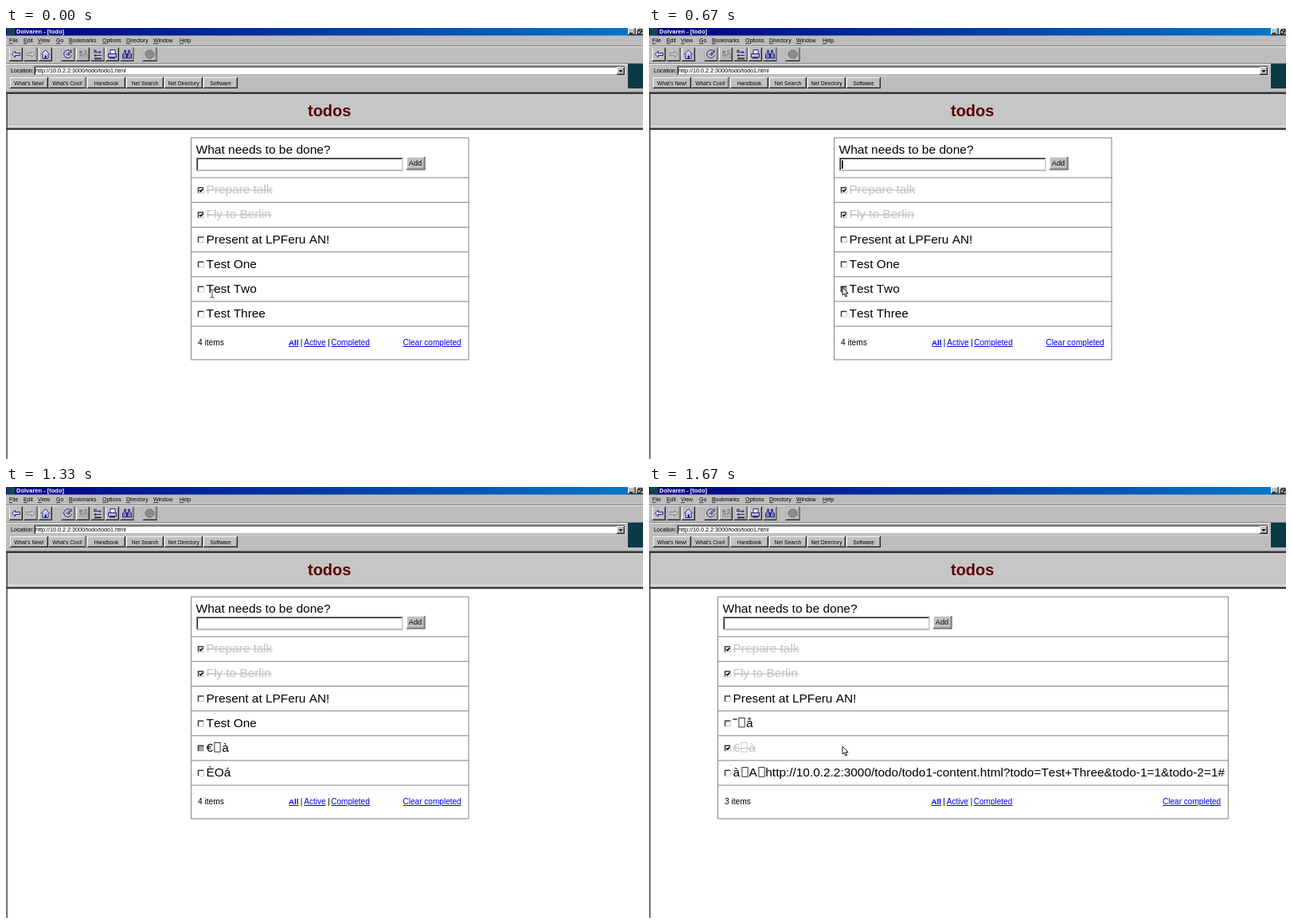
These frames come from a looping animation (800x542 px, 5000 ms). An HTML page:

```html
<!DOCTYPE html>
<html lang="en">
<head>
<meta charset="utf-8">
<title>todo</title>
<style>
  html, body { margin: 0; width: 100%; height: 100%; overflow: hidden; background: #fff; }
  svg { display: block; width: 100%; height: 100%; }
  text { font-family: "Liberation Sans", Arial, sans-serif; font-kerning: none; white-space: pre; }
</style>
</head>
<body>
<svg id="stage" viewBox="0 0 800 542"></svg>
<script>
const LOOP = 5000;
const stage = document.getElementById('stage');

const rect = (x, y, w, h, fill, extra = '') =>
  `<rect x="${x}" y="${y}" width="${w}" height="${h}" fill="${fill}" ${extra}/>`;
const path = (d, stroke, fill = 'none', width = 1) =>
  `<path d="${d}" stroke="${stroke}" fill="${fill}" stroke-width="${width}"/>`;
const text = (x, y, size, str, fill = '#000', extra = '') =>
  `<text x="${x}" y="${y}" font-size="${size}" fill="${fill}" ${extra}>${str}</text>`;

// Raised grey box with light and dark edges
const raised = (x, y, w, h, face = '#c0c0c0') =>
  rect(x, y, w, h, '#222') + rect(x, y, w - 1, h - 1, '#f4f4f4') +
  rect(x + 1, y + 1, w - 2, h - 2, '#808080') + rect(x + 1, y + 1, w - 3, h - 3, face);

const sunken = (x, y, w, h) =>
  rect(x, y, w, h, '#ddd') + rect(x, y, w - 1, h - 1, '#808080') +
  rect(x + 1, y + 1, w - 2, h - 2, '#c8c8c8') + rect(x + 1, y + 1, w - 3, h - 3, '#222') +
  rect(x + 2, y + 2, w - 4, h - 4, '#fff');

const groove = y => rect(0, y, 800, 1, '#808080') + rect(0, y + 1, 800, 1, '#eee');

function icons() {
  const blue = '#20208c', grey = '#858585';
  const arrow = 'M0 4L4 0V2.5H10V5.5H4V8Z';
  const at = (x, y, body) => `<g transform="translate(${x} ${y})">${body}</g>`;
  return at(7.5, 29, path(arrow, blue, '#d8d8ff')) +
    at(36, 29, `<g transform="scale(-1 1)">${path(arrow, grey, '#ccc')}</g>`) +
    at(44, 27.5, path('M0 6L5.5 0L11 6M2 5V11H9V5', blue, '#d8d8ff') + rect(4.5, 7, 2.5, 4, blue)) +
    at(72, 27, path('M9.5 2.5A5 5 0 1 0 10.5 7M10 0V4H6', blue) + path('M3.5 6H8M6 4L8 6L6 8', blue)) +
    at(92, 27.5, rect(0, 1, 4, 4, grey) + rect(6, 0, 4, 4, '#999') + path('M1 11V7H4V11M7 11V5H10V11M0 7L10 5', grey)) +
    at(110, 27.5, path('M0 3H9M7 1L9 3L7 5M1 7H10M3 5L1 7L3 9', blue) + rect(1, 10, 9, 2, '#333') + rect(0, 0, 4, 2, '#555')) +
    at(128, 27.5, path('M3 5V0H9V5', blue, '#fff') + path('M.5 5H10.5V9.5H.5Z', blue, '#bbc') + rect(2, 9, 7, 2, blue)) +
    at(146.5, 28, path('M2 0H4V4L5 5V10H0V5L2 3ZM7 0H9V3L11 5V10H6V5L7 4Z', blue, '#8080b8') + rect(4, 4, 3, 2, blue)) +
    at(175, 28, path('M3 0H8L11 3V7L8 10H3L0 7V3Z', '#777', '#8c8c8c'));
}

function chrome() {
  const menu = [['File', 4], ['Edit', 22], ['View', 40], ['Go', 63], ['Bookmarks', 79],
    ['Options', 121], ['Directory', 151], ['Window', 185], ['Help', 218]];
  const tools = [[4, 17], [22.5, 17], [41, 17], [69.5, 17], [88, 17], [106.5, 17], [125, 17], [143.5, 17], [171.5, 18]];
  const shortcuts = [["What's New!", 5, 48], ["What's Cool!", 53.5, 47], ['Handbook', 102, 48],
    ['Net Search', 151, 47], ['Net Directory', 199, 48], ['Software', 248, 43]];
  return `<defs><linearGradient id="bar"><stop stop-color="#000082"/><stop offset="1" stop-color="#0878c8"/></linearGradient></defs>` +
    rect(0, 0, 800, 128, '#bdbdbd') + rect(0, 0, 800, 9.5, 'url(#bar)') +
    rect(1, 0, 10, 9, '#17434c') +
    text(13, 6.8, 7.5, 'Dolvaren - [todo]', '#fff', 'font-weight="bold"') +
    raised(781, 0, 9.5, 9) + rect(783, 6, 4, 1.3, '#000') +
    raised(791, 0, 10, 9) + path('M794.5 3V1.5H798.5V5H797M793 3.5H797V7H793Z', '#000') +
    menu.map(([s, x]) => text(x, 18.4, 6.9,
      `<tspan text-decoration="underline">${s[0]}</tspan>${s.slice(1)}`)).join('') +
    groove(22) +
    tools.map(([x, w]) => raised(x, 24.5, w, 17.5)).join('') + icons() +
    groove(44) +
    text(6, 56.3, 7.1, 'Location:') +
    sunken(35, 47.5, 743, 13) + text(37, 56.4, 7.2, 'http://10.0.2.2:3000/todo/todo1.html') +
    raised(767, 49, 10, 10) + path('M769.5 53H774.5L772 56Z', 'none', '#000') +
    shortcuts.map(([s, x, w]) => raised(x, 62, w, 14) +
      text(x + w / 2, 71.8, 6.7, s, '#000', 'text-anchor="middle"')).join('') +
    rect(781, 45, 19, 31, '#0b3a46') +
    rect(0, 80, 800, 1, '#808080') + rect(0, 81, 800, 2, '#333') +
    rect(2, 83, 798, 40, '#c6c6c6') +
    rect(0, 123, 800, 1.5, '#eee') + rect(0, 124.5, 800, 1.5, '#aaa') + rect(0, 126, 800, 2, '#333') +
    text(406.2, 111, 20, 'todos', '#5c0000', 'font-weight="bold" text-anchor="middle"') +
    rect(0, 128, 800, 414, '#fff') + rect(0, 82, .7, 460, '#888') + rect(.7, 82, 1, 460, '#222');
}

function checkbox(x, y, done, pressed) {
  return rect(x, y, 8, 8, '#d4d4d4') + rect(x, y, 7.3, 7.3, '#333') +
    rect(x + 1.4, y + 1.4, 5.9, 5.9, pressed ? '#a8a8a8' : '#fff') +
    (done ? path(`M${x + 2.3} ${y + 3.8}l1.5 1.7l2.9 -3.3`, '#000', 'none', 1.6) : '');
}

// Each part is [offset, string]; an empty string draws the missing-glyph box
function row(x, i, { parts, done, pressed, width }) {
  const top = 188 + i * 31.15, base = top + 20.2, ink = done ? '#c0c0c0' : '#000';
  return rect(x, top, 1, 1, '#888') +
    checkbox(x + 8.8, top + 12, done, pressed) +
    parts.map(([dx, s]) => s ? text(x + 19.5 + dx, base, 15.4, s, ink)
      : rect(x + 19.5 + dx + .4, base - 11.3, 7.2, 11.6, 'none', `stroke="${ink}" stroke-width=".8"`)).join('') +
    (done ? rect(x + 19.8, base - 4.9, width, 1.2, ink) : '');
}

function card(x, w, rows, left, linkX) {
  const right = x + w;
  const link = (lx, s, extra = '', size = 10.05) =>
    text(lx, 399, size, s, '#0000e8', `text-decoration="underline" ${extra}`);
  const lines = Array.from({ length: 7 }, (_, i) => rect(x, 187.6 + i * 31.15, w, 1.1, '#8c8c8c')).join('');
  return rect(x + .5, 138.1, w - 1, 279, '#fff', 'stroke="#8c8c8c" stroke-width="1.1"') + lines +
    text(x + 6.6, 158, 15.5, 'What needs to be done?') +
    sunken(x + 7, 163, 260, 17.3) +
    raised(x + 271, 162, 23.5, 16.5) + text(x + 273.8, 173, 9.2, 'Add') +
    rows.map((r, i) => row(x, i, r)).join('') +
    text(x + 9, 399, 10.2, `${left} items`) +
    link(linkX, 'All', 'font-weight="bold"', 9.8) + text(linkX + 14.7, 399, 10, '|') +
    link(linkX + 19.3, 'Active') + text(linkX + 49.2, 399, 10, '|') +
    link(linkX + 53.2, 'Completed') +
    link(right - 9.8, 'Clear completed', 'text-anchor="end"');
}

const plain = s => ({ parts: [[0, s]] });
const head = [
  { parts: [[0, 'Prepare talk']], done: true, width: 83 },
  { parts: [[0, 'Fly to Berlin']], done: true, width: 82 },
  plain('Present at LPFeru AN!')
];
const testOne = plain('Test One');
const euro = [[0, '€'], [10, ''], [19.8, 'à']];
const longUrl = 'http://10.0.2.2:3000/todo/todo1-content.html?todo=Test+Three&amp;todo-1=1&amp;todo-2=1#';

const first = card(232, 349.5, [...head, testOne, plain('Test Two'), plain('Test Three')], 4, 355);
const garbled = card(232, 349.5, [...head, testOne,
  { parts: euro, pressed: true }, plain('ÈOá')], 4, 355);
const last = card(86, 642, [...head,
  { parts: [[0, '˜'], [7, ''], [16.4, 'å']] },
  { parts: euro, done: true, width: 28 },
  { parts: [[0, 'à'], [11, ''], [20, 'A'], [32, ''], [40.8, longUrl]] }], 3, 354.5);

const group = (id, body) => `<g id="${id}">${body}</g>`;
stage.innerHTML = chrome() +
  group('first', first) + group('garbled', garbled) + group('last', last) +
  group('pressed', checkbox(240.8, 324.6, false, true)) +
  group('caret', rect(242, 166.3, 1.7, 10.7, '#000')) +
  group('beam', path('M-2.5 -5H-.6L0 -4.4L.6 -5H2.5M0 -4.5V4.5M-2.5 5H-.6L0 4.4L.6 5H2.5', '#222', 'none', .9)) +
  group('arrow', path('M243 326V336L245.2 334L247 338L248.6 337.3L246.9 333.5H250Z', '#000', '#fff', .9));

const el = id => document.getElementById(id);
const show = (id, on) => el(id).setAttribute('display', on ? 'inline' : 'none');
const between = (t, a, b) => t >= a && t < b;

// Pointer positions: start time, x, y
const beamPath = [[0, 259, 334], [130, 263, 332], [200, 268, 330], [270, 273, 328],
  [400, 275, 327], [470, 268, 327], [530, 257, 327]];

function draw(t) {
  const reflowed = t >= 1530;
  show('first', t < 1330);
  show('garbled', between(t, 1330, 1530));
  show('last', reflowed);
  show('pressed', between(t, 670, 1330));
  show('caret', between(t, 400, 930) || between(t, 1530, 1670));
  el('caret').setAttribute('transform', `translate(${reflowed ? -146 : 0} 0)`);
  show('beam', t < 600);
  const [, x, y] = beamPath.filter(p => p[0] <= t).pop();
  el('beam').setAttribute('transform', `translate(${x} ${y})`);
  show('arrow', between(t, 600, 1130) || reflowed);
}

const start = performance.now();
function tick() {
  draw((performance.now() - start) % LOOP);
  requestAnimationFrame(tick);
}
draw(0);
requestAnimationFrame(tick);
</script>
</body>
</html>
```
